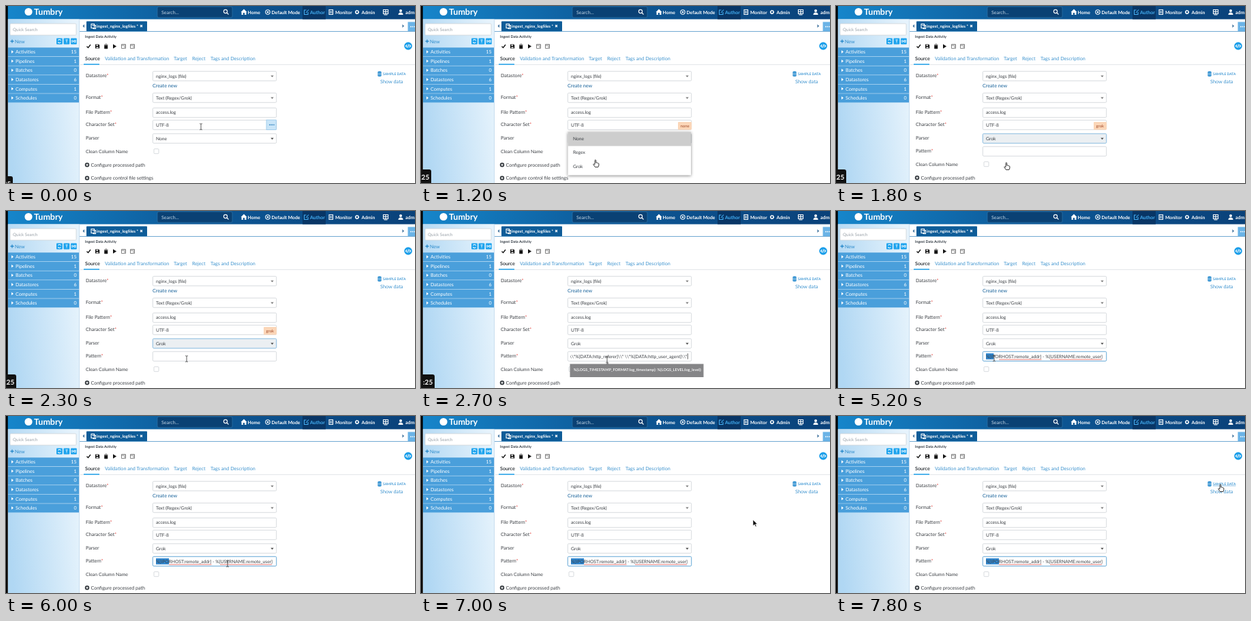
Animation, 600 px wide and 261 px high, one loop 8 s. Source, as an HTML page:

```html
<!DOCTYPE html>
<html lang="en">
<head>
<meta charset="utf-8">
<title>Ingest Data Activity</title>
<style>
html, body { margin: 0; width: 100%; height: 100%; overflow: hidden; background: #fff; }
svg { display: block; width: 100%; height: 100%; }
text { font-family: Lato, "Open Sans", sans-serif; font-size: 7.1px; fill: #3b3f44; white-space: pre; text-rendering: geometricPrecision; }
.nav text { font-size: 7px; font-weight: 700; fill: #fff; }
.val, .val text { font-size: 6.7px; }
.tabs text { font-size: 7.2px; fill: #3f94cf; }
.box { fill: #fff; stroke: #cdd2d6; stroke-width: .8; }
.focus { fill: none; stroke: #6fb2e0; stroke-width: 1; }
.req { fill: #e0403a; }
.side text { font-size: 7.1px; fill: #fff; }
.ico { fill: none; stroke: #fff; stroke-width: 1.1; }
.on { stroke: #45b0f5; }
.nav .now { fill: #45b0f5; }
.val .tag { font-size: 6px; }
.tag { font-size: 6px; fill: #a5502f; }
.sheet { fill: #fff; filter: drop-shadow(0 1px 2px #0007); }

.t { animation: 8s step-end infinite; }
.more { animation-name: more; }
.menu { animation-name: menu; }
.none { animation-name: none-val; }
.late { animation-name: late; }
.drop { animation-name: drop; }
.grok { animation-name: grok; }
.tail { animation-name: tail; }
.head { animation-name: head; }
.hint { animation-name: hint; }
.edit { animation-name: edit; }
.sel { animation-name: sel; transform-origin: 220px 0; }
.hover { animation-name: hover; }
.chip { animation-name: chip; animation-timing-function: linear; }
.move { animation-name: move; }
.beam { animation-name: beam; }
.hand { animation-name: hand; }
.arrow { animation-name: arrow; }

@keyframes more { 0% { opacity: 1 } 7.5%, 100% { opacity: 0 } }
@keyframes menu { 0% { opacity: 0 } 12.5% { opacity: 1 } 22.5%, 100% { opacity: 0 } }
@keyframes none-val { 0% { opacity: 1 } 22.5%, 100% { opacity: 0 } }
@keyframes late { 0% { opacity: 0 } 22.5%, 100% { opacity: 1 } }
@keyframes drop { 0% { transform: none } 22.5%, 100% { transform: translateY(19px) } }
@keyframes grok { 0% { opacity: 0 } 22.5% { opacity: 1 } 30%, 100% { opacity: 0 } }
@keyframes tail { 0% { opacity: 0 } 31.25% { opacity: 1 } 42.5%, 100% { opacity: 0 } }
@keyframes head { 0% { opacity: 0 } 42.5%, 100% { opacity: 1 } }
@keyframes hint { 0% { opacity: 0 } 32.5% { opacity: 1 } 36.25%, 100% { opacity: 0 } }
@keyframes edit { 0% { opacity: 0 } 60%, 100% { opacity: 1 } }
@keyframes sel {
  0% { transform: scaleX(0) } 62.5% { transform: scaleX(.25) } 65% { transform: scaleX(.6) }
  67.5% { transform: scaleX(.85) } 70%, 100% { transform: none }
}
@keyframes hover { 0% { opacity: 0 } 95%, 100% { opacity: 1 } }
@keyframes chip {
  0%, 1.25% { transform: translate(-10px, 10px) } 10%, 28.75% { transform: translate(-5px, 0) }
  32.5%, 35% { transform: none } 37.5%, 100% { transform: translate(-10px, 24px) }
}
@keyframes beam { 0% { opacity: 1 } 10% { opacity: 0 } 27.5% { opacity: 1 } 40% { opacity: 0 } 52.5% { opacity: 1 } 82.5%, 100% { opacity: 0 } }
@keyframes arrow { 0% { opacity: 0 } 10% { opacity: 1 } 12.5% { opacity: 0 } 40% { opacity: 1 } 52.5% { opacity: 0 } 82.5% { opacity: 1 } 92.5%, 100% { opacity: 0 } }
@keyframes hand { 0% { opacity: 0 } 12.5% { opacity: 1 } 27.5% { opacity: 0 } 92.5%, 100% { opacity: 1 } }
@keyframes move {
  0% { transform: translate(286px, 178px) }
  5% { transform: translate(285px, 181px) }
  7.5% { transform: translate(281px, 188px) }
  10% { transform: translate(275px, 194px) }
  12.5% { transform: translate(266px, 205px) }
  15% { transform: translate(257px, 232px) }
  17.5% { transform: translate(253px, 235px) }
  20% { transform: translate(251px, 236px) }
  25% { transform: translate(256px, 229px) }
  27.5% { transform: translate(265px, 218px) }
  32.5% { transform: translate(273px, 219px) }
  37.5% { transform: translate(327px, 213px) }
  40% { transform: translate(438px, 207px) }
  42.5% { transform: translate(439px, 198px) }
  47.5% { transform: translate(472px, 189px) }
  50% { transform: translate(430px, 199px) }
  51.25% { transform: translate(372px, 209px) }
  53.75% { transform: translate(318px, 219px) }
  55% { transform: translate(229px, 218px) }
  57.5% { transform: translate(239px, 217px) }
  60% { transform: translate(220px, 217px) }
  62.5% { transform: translate(225px, 217px) }
  65% { transform: translate(232px, 217px) }
  67.5% { transform: translate(236px, 217px) }
  70% { transform: translate(240px, 218px) }
  71.25% { transform: translate(270px, 218px) }
  73.75% { transform: translate(318px, 218px) }
  75% { transform: translate(325px, 218px) }
  80% { transform: translate(329px, 217px) }
  82.5% { transform: translate(384px, 204px) }
  83.75% { transform: translate(434px, 187px) }
  86.25% { transform: translate(490px, 158px) }
  88.75% { transform: translate(535px, 130px) }
  91.25% { transform: translate(556px, 113px) }
  93.75% { transform: translate(562px, 104px) }
  97.5%, 100% { transform: translate(565px, 106px) }
}
</style>
</head>
<body>
<svg viewBox="0 0 600 261" preserveAspectRatio="none">
  <defs>
    <linearGradient id="bar"><stop stop-color="#1686cb"/><stop offset=".45" stop-color="#0d5998"/><stop offset="1" stop-color="#0a4179"/></linearGradient>
    <linearGradient id="pane" y1=".6" y2=".4"><stop stop-color="#b0d7f3"/><stop offset="1" stop-color="#e6f3fc"/></linearGradient>
    <clipPath id="field"><rect x="219" y="207" width="173" height="15"/></clipPath>
    <path id="caret" d="M-2.2-1H2.2L0 1.6Z"/>
  </defs>

  <!-- top bar -->
  <rect width="600" height="19.5" fill="url(#bar)"/>
  <circle cx="33" cy="8.5" r="5.6" fill="#fff"/>
  <text x="41" y="13" style="font-size:12.5px;font-weight:700;fill:#fff">Tumbry</text>
  <g class="nav">
    <rect x="222" y="1" width="110" height="16" rx="2" fill="#0a4174" stroke="#3579ad" stroke-width=".6"/>
    <text x="228" y="11.5" style="font-weight:400;fill:#c4d8e8">Search...</text>
    <circle class="ico" cx="322" cy="8" r="2.6"/><path class="ico" d="M324 10l2.5 2.5"/>
    <rect x="435" width="34" height="19.5" fill="#083565"/>
    <path fill="#fff" d="M344.500 9l4.500-4.500 4.500 4.500h-1v4h-2.500v-3h-2v3h-2.500V9Z"/>
    <text x="354.500" y="11.500" style="font-size:6.800px">Home</text>
    <circle class="ico" cx="384" cy="9" r="3.2"/><circle cx="384" cy="9" r="1.3" fill="#fff"/>
    <text x="389.5" y="11.5" style="font-size:6.800px">Default Mode</text>
    <path class="ico on" d="M443 9v3.500h-5.500V6h3M440 10l4-4.500"/>
    <text class="now" x="446" y="11.5">Author</text>
    <path class="ico" d="M474 5.500h5.500v7h-5.500ZM475 8h3.500M475 10h3.500"/>
    <text x="483" y="11.5" style="font-size:6.800px">Monitor</text>
    <circle class="ico" cx="515" cy="9" r="2.6" stroke-width="2" stroke-dasharray="1.4 .7"/><circle class="ico" cx="515" cy="9" r="2"/>
    <text x="521.500" y="11.5" style="font-size:6.800px">Admin</text>
    <path class="ico" stroke-width=".9" d="M553.500 5.500h7v6h-7ZM553.500 8.500h7M557 5.500v6M554.500 13h5"/>
    <circle cx="579" cy="7" r="2" fill="#fff"/><path fill="#fff" d="M575.500 13a3.500 3.500 0 0 1 7 0Z"/>
    <text x="586" y="11.5">admin</text>
  </g>

  <!-- sidebar -->
  <rect x="3" y="19.5" width="104.500" height="242" fill="url(#pane)"/>
  <path d="M107.500 19.500V261" stroke="#b5d2e8" stroke-width=".7"/>
  <rect class="box" x="6" y="26" width="97" height="17" rx="1.500"/>
  <text x="10" y="36.500" style="font-size:6.300px;fill:#9aa2a9">Quick Search</text>
  <path d="M6.500 52h5M9 49.500v5" stroke="#2a8acb" stroke-width="1.300"/>
  <text x="13" y="54.500" style="fill:#2a8acb">New</text>
  <g fill="#1ca3ee"><rect x="74" y="47.500" width="8.800" height="9" rx="1"/><rect x="84.500" y="47.500" width="8.800" height="9" rx="1"/><rect x="95" y="47.500" width="8.800" height="9" rx="1"/></g>
  <g class="ico" stroke-width=".9">
    <path d="M80.500 51a2.200 2.200 0 0 0-4-.3M76.300 53a2.200 2.200 0 0 0 4 .3"/>
    <path d="M87.500 50h3M88 52h2M88.500 54h1"/><path d="M97 50v4M102 50v4M100.800 50.500l-2 1.500 2 1.500"/>
  </g>
  <g class="side" id="side"></g>

  <!-- document tabs -->
  <path d="M115 27v5l-2.500-2.500ZM581.500 27v5l2.500-2.500Z" fill="#3b6f9b"/>
  <rect x="118" y="22.500" width="89" height="15" rx="1" fill="#0e5c98"/>
  <path class="ico" stroke-width=".9" d="M125 26.500h4.500v6h-4.500ZM126.500 28.500h5v5h-4"/>
  <text x="133" y="32" style="font-size:6.200px;font-weight:700;fill:#fff">ingest_nginx_logfiles *</text>
  <path class="ico" stroke-width=".8" d="M197 28l3 3M200 28l-3 3"/>
  <path d="M108 37.500H600" stroke="#4d93c7" stroke-width=".8"/>
  <rect x="589.500" y="23.500" width="11" height="13.500" fill="#6ab3e6"/>
  <path d="M593 30.500h8" stroke="#fff" stroke-width="1.500" stroke-dasharray="1.500 1"/>

  <!-- toolbar -->
  <text x="116" y="47" style="font-size:5.300px;font-weight:600;fill:#17212b">Ingest Data Activity</text>
  <path d="M118.500 59.500l2 2 3.500-4.500" fill="none" stroke="#111" stroke-width="1.300"/>
  <path d="M131 56.500h5l1.200 1.200v4.800h-6.200Z" fill="#111"/><path d="M132.300 57.200h2.800v1.600h-2.800ZM132.500 60.500h3v1.500h-3Z" fill="#fff"/>
  <path d="M144 57.200h5.500M146 56h1.500M144.600 58.300h4.300v4.500h-4.300Z" fill="#111" stroke="#111" stroke-width=".7"/>
  <path d="M157 56.300l5 3.200-5 3.200Z" fill="#111"/>
  <g fill="#fff" stroke="#777" stroke-width=".9"><path d="M169.500 56.500h6v6h-6ZM169.500 58.200h6M173 60.500h2.500M182.500 56.500h6v6h-6ZM182.500 58.200h6M186 60.500h2.500"/></g>
  <circle cx="590" cy="59" r="5.800" fill="#1c9fea"/>
  <path class="ico" stroke-width=".8" d="M588.300 57.200l-1.800 1.800 1.800 1.800M591.700 57.200l1.800 1.800-1.800 1.800M590.700 56.600l-1.400 4.800"/>

  <!-- section tabs -->
  <path d="M109 86.500H600" stroke="#d9dde0" stroke-width=".7"/>
  <path d="M114 86H137" stroke="#1c9fea" stroke-width="1.500"/>
  <g class="tabs">
    <text x="116" y="79.500" style="font-weight:600;fill:#20262c">Source</text>
    <text x="145" y="79.500">Validation and Transformation</text>
    <text x="246" y="79.500">Target</text>
    <text x="273" y="79.500">Reject</text>
    <text x="300" y="79.500">Tags and Description</text>
  </g>

  <!-- sample data -->
  <g fill="#2f8fd0"><path d="M545.300 97.500h5.400v5.500h-5.400Z"/><ellipse cx="548" cy="97.300" rx="2.700" ry="1.100"/><ellipse cx="548" cy="103" rx="2.700" ry="1"/></g>
  <path d="M545.300 99.300h5.400M545.300 101.300h5.400" stroke="#fff" stroke-width=".5"/>
  <text x="553" y="101.800" style="font-size:5px;font-weight:600;fill:#2f8fd0">SAMPLE DATA</text>
  <path class="t hover" d="M553 103H586.500" stroke="#2f8fd0" stroke-width=".5"/>
  <text x="549" y="113.500" style="font-size:7.300px;fill:#3f94cf">Show data</text>

  <!-- form -->
  <g id="form"></g>
  <g class="val">
    <text x="220" y="105.500">nginx_logs (file)</text>
    <text x="220" y="137.500">Text (Regex/Grok)</text>
    <text x="220" y="159.300">access.log</text>
    <text x="220" y="177.500">UTF-8</text>
    <text class="t none" x="220" y="197.500">None</text>
  </g>
  <text x="215" y="119.500" style="font-size:7.200px;fill:#135f98">Create new</text>
  <g class="t more">
    <rect x="382" y="168" width="14.500" height="14.500" fill="#c9e5f8" stroke="#8fc4e8" stroke-width=".7"/>
    <path d="M386 175.200h8" stroke="#2a7fbd" stroke-width="1.400" stroke-dasharray="1.400 1"/>
  </g>

  <g class="t grok">
    <rect x="215.300" y="188.300" width="181.400" height="14" rx="1.500" fill="#ebeff2" stroke="#8fc1e4"/>
    <rect x="378" y="171" width="19" height="11.500" rx="1" fill="#fbd6b8"/>
    <text class="tag" x="381.500" y="179">grok</text>
  </g>
  <g class="t late"><text class="val" x="220" y="197.500">Grok</text></g>
  <use href="#caret" x="390.500" y="103.500" fill="#777"/>
  <use href="#caret" x="390.500" y="135.500" fill="#777"/>
  <use href="#caret" x="390.500" y="195.500" fill="#444"/>

  <g class="t drop">
    <text x="117" y="216.500" style="font-size:6.900px">Clean Column Name</text>
    <rect class="box" x="217" y="210.700" width="7" height="7" rx="1"/>
    <g fill="#30353a"><circle cx="119" cy="234.300" r="3.200"/><circle cx="119" cy="253.800" r="3.200"/></g>
    <path class="ico" d="M117.200 234.300h3.600M119 232.500v3.600M117.200 253.800h3.600M119 252v3.600" stroke-width=".9"/>
    <text x="124.500" y="236.800">Configure processed path</text>
    <text x="124.500" y="256.300">Configure control file settings</text>
  </g>

  <g class="t late">
    <text x="117" y="216.300">Pattern<tspan class="req">*</tspan></text>
    <rect class="box" x="215.300" y="207.300" width="181.400" height="14" rx="1.500"/>
  </g>
  <g class="val" clip-path="url(#field)">
    <g class="t tail">
      <text x="390.500" y="216.500" text-anchor="end">%{NUMBER:bytes} \\"%{DATA:http_referer}\\" \\"%{DATA:http_user_agent}\\"</text>
      <path d="M391.300 210v8.500" stroke="#222" stroke-width=".7"/>
    </g>
    <g class="t sel"><rect x="220" y="209.800" width="19" height="9" fill="#2f86cf"/></g>
    <g class="t head">
      <text x="220" y="216.500">%{IPORHOST:remote_addr} - %{USERNAME:remote_user} \[%{HTTPDATE:time_local}\]</text>
    </g>
    <g class="t edit">
      <path d="M239 219H301.500M314 219H390" stroke="#e2564f" stroke-width=".8"/>
    </g>
  </g>
  <rect class="focus t edit" x="215.300" y="207.300" width="181.400" height="14" rx="1.500"/>

  <!-- parser menu -->
  <g class="t menu val">
    <rect x="377" y="171" width="20" height="11.500" rx="1" fill="#fbd6b8"/>
    <text class="tag" x="380.500" y="179">none</text>
    <rect class="sheet" x="215.500" y="185.500" width="180.500" height="64"/>
    <rect x="215.500" y="185.500" width="180.500" height="21" fill="#cdcdcd"/>
    <text x="223" y="197.800">None</text>
    <text x="223" y="218">Regex</text>
    <text x="223" y="238.500">Grok</text>
  </g>

  <g class="t hint">
    <path d="M218.500 225.500h53l2-2.500 2 2.500H414.500V245H218.500Z" fill="#858587"/>
    <text x="223.800" y="236.300" style="font-size:5.600px;font-weight:600;fill:#fff">%{LOGS_TIMESTAMP_FORMAT:log_timestamp}: %{LOGS_LEVEL:log_level}:</text>
  </g>

  <!-- pointer -->
  <g class="t move">
    <path class="t beam" d="M-1.800-4.500Q0-4.500 0-3.500Q0-4.500 1.800-4.500M0-3.500V3.500M-1.800 4.500Q0 4.500 0 3.500Q0 4.500 1.800 4.500" fill="none" stroke="#333" stroke-width=".8"/>
    <path class="t arrow" d="M-3-5V4L-.8 2 .8 5.300 2.200 4.600.7 1.500H3.500Z" fill="#111" stroke="#fff" stroke-width=".6"/>
    <path class="t hand" d="M-2-4.500Q-1.200-6-.3-4.500V-.8Q.6-1.600 1.200-.6 2.200-1.200 2.700-.1 3.900-.3 3.900 1V3L2.900 5.500H-1.600L-4.200 1.600Q-4 .1-2 1.600Z" fill="#fff" stroke="#222" stroke-width=".9" stroke-linejoin="round"/>
  </g>

  <!-- player edge -->
  <rect width="2.700" height="261" fill="#000"/>
  <g class="t chip">
    <rect x="-14" y="241" width="34" height="26" rx="3" fill="#111"/>
    <text x="3" y="256.300" style="font-size:10px;font-weight:700;fill:#fff">:25</text>
  </g>
</svg>
<script>
const fill = (id, html) => document.getElementById(id).innerHTML = html;

const groups = [["Activities", 15], ["Pipelines", 1], ["Batches", 0], ["Datastores", 6], ["Computes", 1], ["Schedules", 0]];
fill("side", groups.map(([name, count], i) => {
  const y = 61.3 + i * 13.6;
  return `<rect x="3" y="${y}" width="104" height="13" fill="#4a9fdb"/>
    <path d="M8 ${y + 4}l3 2.300-3 2.300Z" fill="#fff"/>
    <text x="14" y="${y + 8.8}">${name}</text>
    <text x="103.500" y="${y + 8.8}" text-anchor="end">${count}</text>`;
}).join(""));

const rows = [["Datastore", 96], ["Format", 128], ["File Pattern", 150], ["Character Set", 168], ["Parser", 188]];
fill("form", rows.map(([label, y]) => {
  const star = label === "Parser" ? "" : '<tspan class="req">*</tspan>';
  return `<text x="117" y="${y + 9.2}">${label}${star}</text>
    <rect class="box" x="215.300" y="${y + .3}" width="181.400" height="14" rx="1.500"/>`;
}).join(""));
</script>
</body>
</html>
```
